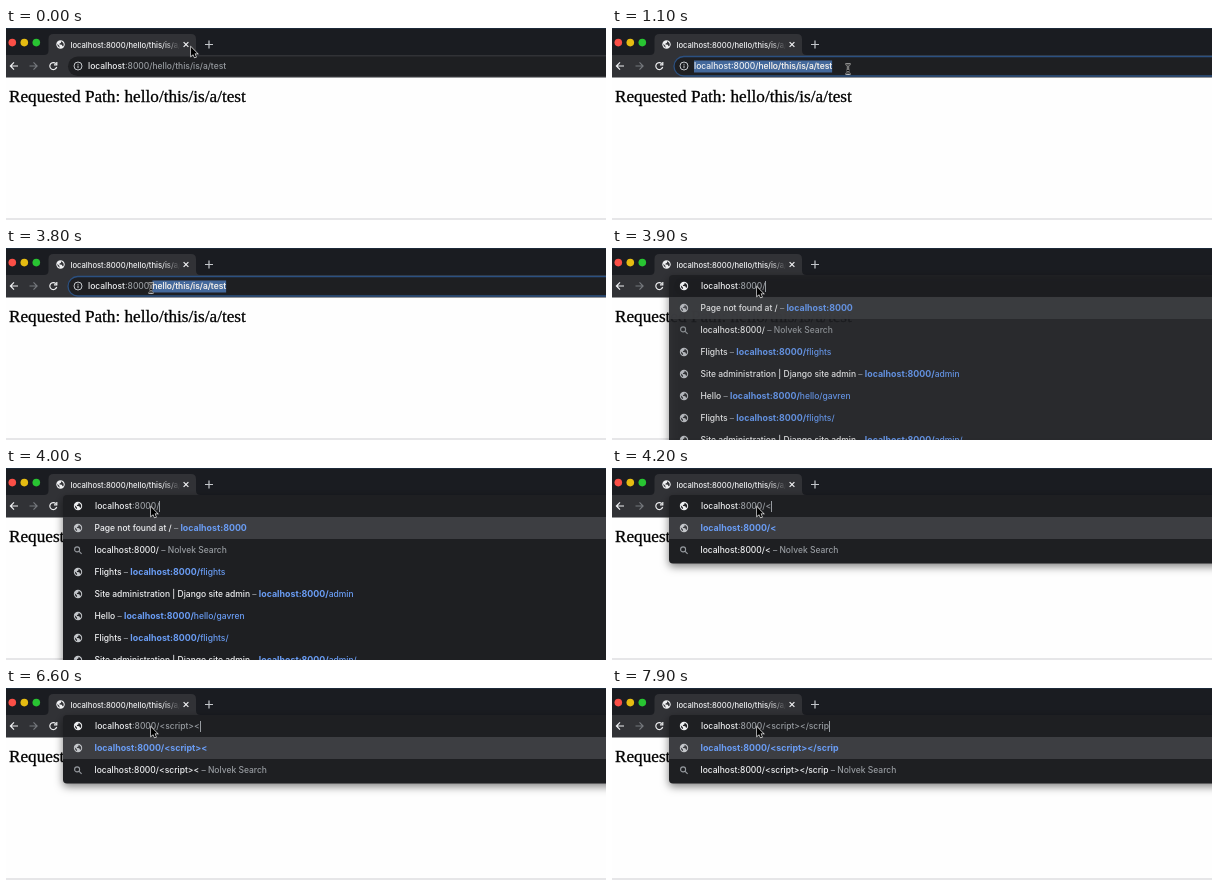
An HTML page with a canvas that plays this animation: 600x192 px, repeating every 8 s.

```html
<!DOCTYPE html>
<html>
<head>
<meta charset="utf-8">
<style>
  html, body { margin: 0; width: 100%; height: 100%; overflow: hidden; background: #fff; }
  canvas { display: block; }
</style>
</head>
<body>
<canvas id="stage" width="600" height="192"></canvas>
<script>
const ctx = document.getElementById('stage').getContext('2d');
const LOOP = 8000, STEP = 100;
const FOCUS = 1100, DESELECT = 1400, DRAG = 2000, OPEN = 3900;
const WHITE = '#eff0f2', GREY = '#979b a0'.replace(' ', ''), BLUE = '#6a9df5';
const STRIP = '#1a1c21', DARK = '#1e1f22', TOOLBAR = '#313236', HOVER = '#3d3e42', ICON = '#c4c7cb';
const HOST = 'localhost', PORT = ':8000/', PATH = 'hello/this/is/a/test';
const URL_TEXT = HOST + PORT;
const TYPED = '<script><\/scrip';
const KEY_TIMES = [4200, 4700, 4900, 5000, 5200, 5300, 5500, 6100, 6600, 6900, 7300, 7500, 7700, 7800, 7900];
const POINTER = [ // time, x, y
  [0, 185, 19], [100, 183, 18], [300, 184, 21], [500, 202, 46], [600, 215, 58], [800, 226, 52],
  [1000, 235, 42], [1200, 237, 40], [2000, 215, 40], [2100, 180, 40], [2200, 153, 40],
  [2600, 145, 40], [3800, 145, 40]
];

const ui = (size = 8.5, weight = 500) => `${weight} ${size}px Inter, sans-serif`;

function text(str, x, y, color, font = ui()) {
  ctx.font = font;
  ctx.fillStyle = color;
  ctx.fillText(str, x, y);
  return x + ctx.measureText(str).width;
}

function widthOf(str) {
  ctx.font = ui();
  return ctx.measureText(str).width;
}

function rect(x, y, w, h, color) {
  ctx.fillStyle = color;
  ctx.fillRect(x, y, w, h);
}

function rounded(x, y, w, h, r, color) {
  ctx.beginPath();
  ctx.roundRect(x, y, w, h, r);
  ctx.fillStyle = color;
  ctx.fill();
}

function stroke(path, x, y, color, width = 1.2) {
  ctx.save();
  ctx.translate(x, y);
  ctx.strokeStyle = color;
  ctx.lineWidth = width;
  ctx.stroke(new Path2D(path));
  ctx.restore();
}

function disc(x, y, r, color) {
  ctx.beginPath();
  ctx.arc(x, y, r, 0, Math.PI * 2);
  ctx.fillStyle = color;
  ctx.fill();
}

function globe(x, y, color, back) {
  disc(x, y, 4.2, color);
  ctx.save();
  ctx.translate(x, y);
  ctx.fillStyle = back;
  ctx.fill(new Path2D('M-3.3-.8L-1.2 1.2L-.8 3.3Q-3.2 2.4-3.3-.8ZM.6-3.2L.5-1.7L-1.2-.8L-.9.1L1.3.2L2 1.8L3 1.4Q4-1.6.6-3.2Z'));
  ctx.restore();
}

const magnifier = (x, y) => stroke('M1.6-.9A2.5 2.5 0 1 1-3.4-.9A2.5 2.5 0 1 1 1.6-.9ZM.9.9L3.6 3.6', x, y, GREY, 1.1);

function drawPage() {
  rect(0, 0, 600, 192, '#fefefe');
  rect(0, 190.5, 600, 1, '#cfd0d4');
  const line = 'Requested Path: ' + PATH;
  text(line, 3, 74, '#000', '17.2px "Liberation Serif", serif');
  // A hairline gives the text the slightly heavier look of smoothed type.
  ctx.strokeStyle = '#000';
  ctx.lineWidth = .3;
  ctx.strokeText(line, 3, 74);
}

function drawWindow(focused) {
  drawPage();
  rect(0, 0, 600, 27, STRIP);
  rect(0, 0, 600, 1, '#1c2a39');
  rect(0, 27, 600, 22.5, TOOLBAR);
  ['#fb4f47', '#e6bc12', '#28c432'].forEach((color, i) => disc(6.3 + i * 12, 14.6, 3.8, color));

  ctx.fillStyle = TOOLBAR;
  ctx.fill(new Path2D('M38 27Q42.5 27 42.5 22.5V11Q42.5 6 47.5 6H185Q190 6 190 11V22.5Q190 27 194.5 27Z'));
  globe(54.5, 16.5, WHITE, TOOLBAR);
  const fade = ctx.createLinearGradient(158, 0, 174, 0);
  fade.addColorStop(0, WHITE);
  fade.addColorStop(1, 'rgba(239,240,242,0)');
  text(URL_TEXT + PATH, 64.5, 19.5, fade, ui(7.65));
  stroke('M-2.4-2.4L2.4 2.4M2.4-2.4L-2.4 2.4', 180, 16.5, WHITE);
  stroke('M-4 0H4M0-4V4', 203, 16.5, ICON);

  stroke('M4 0H-3.4M0-3.6L-3.6 0L0 3.6', 8, 38, WHITE);
  stroke('M-4 0H3.4M0-3.6L3.6 0L0 3.6', 27.5, 38, '#75787d');
  stroke('M2.6-2.3A3.5 3.5 0 1 0 3.4 1M3.5-4V-1.2H.7', 47.3, 38, WHITE);

  rounded(62, 28.5, 560, 19.5, 9.75, DARK);
  if (focused) {
    ctx.strokeStyle = '#2b5081';
    ctx.lineWidth = 1.3;
    ctx.stroke();
  }
}

function drawAddress(t, pointerX) {
  stroke('M4 0A4 4 0 1 1-4 0A4 4 0 1 1 4 0ZM0-.5V2.2M0-2.2V-1.2', 72, 38, ICON, 1);
  const x = 82, pathX = x + widthOf(URL_TEXT), end = pathX + widthOf(PATH);
  const all = t >= FOCUS && t < DESELECT;
  let from = end;
  if (all) from = x;
  else if (t >= DRAG) from = Math.min(end, Math.max(pathX, pointerX - 7));
  if (from < end) rect(from, 32.5, end - from, 12, '#44699c');
  else if (t >= DESELECT) rect(Math.round(end), 33, 1, 11, GREY);

  const portX = text(HOST, x, 41.2, WHITE);
  text(PORT, portX, 41.2, all ? WHITE : GREY);
  text(PATH, pathX, 41.2, GREY);
  ctx.save();
  ctx.beginPath();
  ctx.rect(from, 30, end - from, 18);
  ctx.clip();
  text(PATH, pathX, 41.2, WHITE);
  ctx.restore();
}

// A suggestion: title, bold match and the rest of its address.
function drawRow(index, { title, match, rest = '', search }) {
  const y = 60 + index * 22, base = y + 3.2;
  if (index === 0) rect(57, 49, 543, 22, HOVER);
  if (search) magnifier(72, y + .3);
  else globe(72, y, ICON, index ? DARK : HOVER);
  let x = 88.5;
  if (title) {
    x = text(title, x, base, WHITE);
    x = text(' – ', x, base, GREY);
  }
  if (search) text('Nolvek Search', x, base, GREY);
  else text(rest, text(match, x, base, BLUE, ui(8.85, 700)), base, BLUE);
}

function suggestions(typed) {
  const url = URL_TEXT + typed;
  const search = { title: url, search: true };
  if (typed) return [{ match: url }, search];
  const page = (title, rest) => ({ title, match: url, rest });
  const admin = 'Site administration | Django site admin';
  return [
    { title: 'Page not found at /', match: 'localhost:8000' }, search,
    page('Flights', 'flights'), page(admin, 'admin'), page('Hello', 'hello/gavren'),
    page('Flights', 'flights/'), page(admin, 'admin/')
  ];
}

function drawDropdown(t) {
  const count = KEY_TIMES.filter(k => k <= t).length;
  const typed = TYPED.slice(0, count);
  const lastKey = count ? KEY_TIMES[count - 1] : OPEN;
  const rows = suggestions(typed);

  // The panel is still see-through in its first step.
  ctx.save();
  ctx.globalAlpha = t < OPEN + STEP ? .89 : 1;
  ctx.save();
  ctx.shadowColor = 'rgba(0,0,0,.5)';
  ctx.shadowBlur = 9;
  ctx.shadowOffsetY = 3;
  rounded(57, 27, 560, 24.5 + rows.length * 22, 4, DARK);
  ctx.restore();
  ctx.restore();
  rows.forEach((row, i) => drawRowOver(row, i, t));
  globe(72, 38, WHITE, DARK);
  const end = text(PORT + typed, text(HOST, 89, 41.2, WHITE), 41.2, GREY);
  if ((t - lastKey) % 1000 < 500) rect(Math.round(end), 33, 1, 11, GREY);
}

function drawRowOver(row, index, t) {
  ctx.save();
  if (t < OPEN + STEP) ctx.globalAlpha = .89;
  drawRow(index, row);
  ctx.restore();
}

function pointerAt(t) {
  if (t >= OPEN) return [145, 39];
  const i = POINTER.findIndex(p => p[0] > t);
  if (i < 0) return [145, 40];
  const [t0, x0, y0] = POINTER[i - 1], [t1, x1, y1] = POINTER[i];
  // The pointer rests before the drag and then jumps into it.
  const k = t0 === 1200 ? 0 : (t - t0) / (t1 - t0);
  return [x0 + (x1 - x0) * k, y0 + (y1 - y0) * k];
}

function drawPointer(x, y, beam) {
  if (beam) {
    const path = 'M-2.5-5Q0-5 0-3.5Q0-5 2.5-5M0-4V4M-2.5 5Q0 5 0 3.5Q0 5 2.5 5M-1.3 1.5H1.3';
    stroke(path, x, y, '#e4e4e4', 2.2);
    stroke(path, x, y, '#111', 1);
    return;
  }
  const arrow = 'M0 0V9L2.1 7.2L3.6 10.4L5 9.8L3.6 6.6H6.4Z';
  stroke(arrow, x, y, '#e8e8e8', 1.3);
  ctx.save();
  ctx.translate(x, y);
  ctx.fillStyle = '#000';
  ctx.fill(new Path2D(arrow));
  ctx.restore();
}

function draw(now) {
  const t = Math.floor(now % LOOP / STEP) * STEP;
  const [x, y] = pointerAt(t);
  drawWindow(t >= FOCUS && t < OPEN);
  if (t < OPEN) drawAddress(t, x);
  else drawDropdown(t);
  drawPointer(x, y, t < OPEN && y > 28 && y < 49);
}

const start = performance.now();
function frame() {
  draw(performance.now() - start);
  requestAnimationFrame(frame);
}
frame();
</script>
</body>
</html>
```
